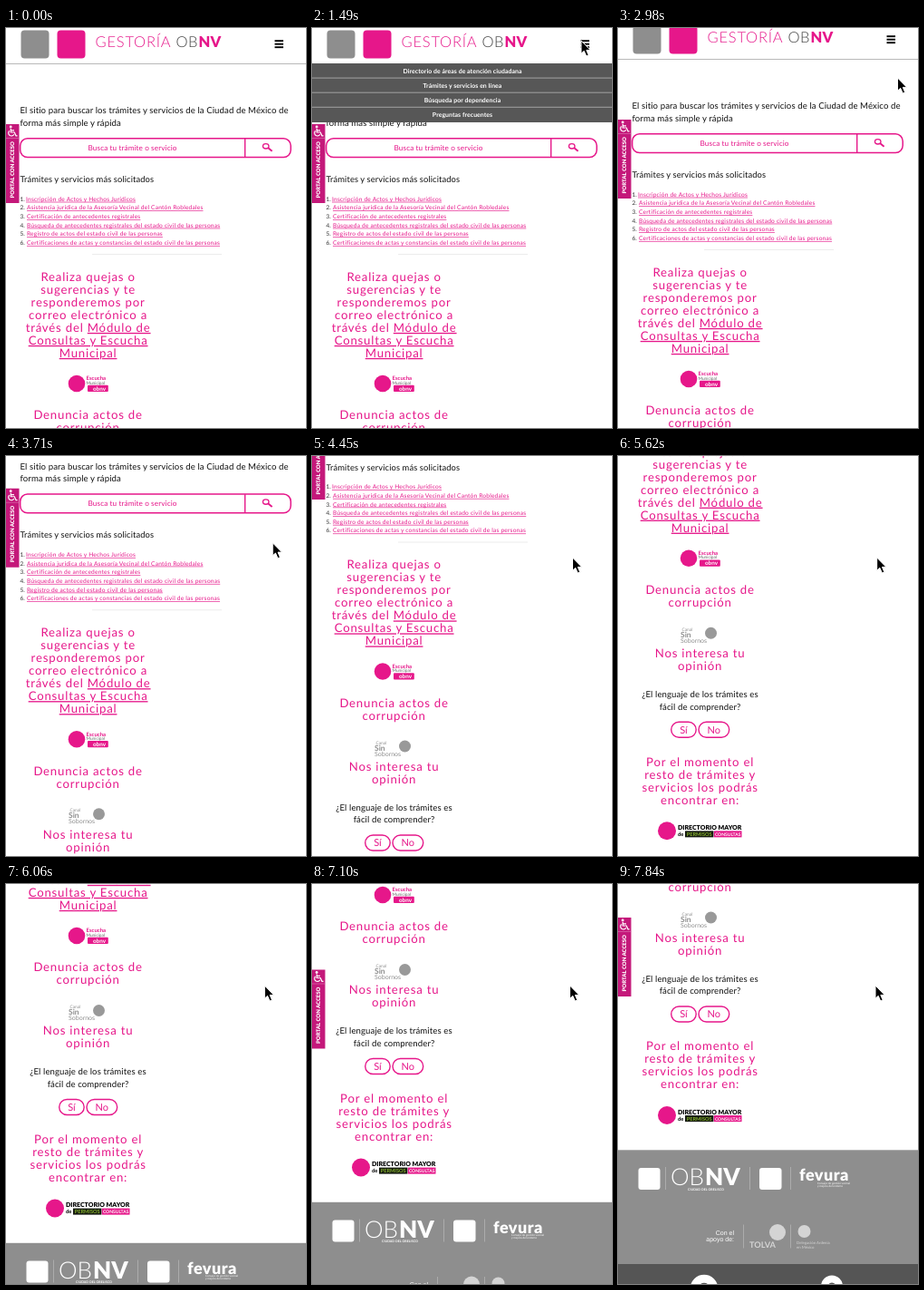
Write an HTML page that moves like this. It is 331x441 px and loops after 7.99 s.

```html
<!DOCTYPE html>
<html lang="es">
<head>
<meta charset="utf-8">
<title>Portal de gestiones</title>
<style>
html, body { margin: 0; width: 100%; height: 100%; overflow: hidden; background: #fff; }
svg { display: block; width: 331px; height: 441px; font-family: Lato, "Open Sans", sans-serif; }
text { text-rendering: geometricPrecision; }
.u { text-decoration: underline; text-decoration-thickness: 0.7px; }
</style>
</head>
<body>
<svg id="stage" viewBox="0 0 331 441"></svg>
<script>
const LOOP = 7990;
const PINK = '#e6178a', DARK = '#111', GREY = '#8e8e8e', PALE = '#d4d4d4';

// ---- markup helpers ----
const text = (x, y, str, size, fill = DARK, extra = '') =>
  `<text x="${x}" y="${y}" font-size="${size}" fill="${fill}" ${extra}>${str}</text>`;
const mid = (x, y, str, size, fill, extra = '') =>
  text(x, y, str, size, fill, 'text-anchor="middle" ' + extra);
const rect = (x, y, w, h, fill, rx = 0, extra = '') =>
  `<rect x="${x}" y="${y}" width="${w}" height="${h}" rx="${rx}" fill="${fill}" ${extra}/>`;
const disc = (x, y, r, fill) => `<circle cx="${x}" cy="${y}" r="${r}" fill="${fill}"/>`;
const line = (x1, y1, x2, y2, stroke, w = 1) =>
  `<path d="M${x1} ${y1}L${x2} ${y2}" stroke="${stroke}" stroke-width="${w}"/>`;
const under = str => `<tspan class="u">${str}</tspan>`;
const bold = 'font-weight="700"';
const light = 'font-weight="300"';
const loose = 'letter-spacing="0.1"';

const heading = (y, rows) => rows.map((row, i) =>
  mid(90.6, y + 4.4 + i * 14, row, 13.2, PINK, 'letter-spacing="0.8"')).join('');

const pill = (x, w, label) =>
  rect(x, 572.5, w, 17, '#fff', 8.5, `stroke="${PINK}" stroke-width="1.4"`) +
  mid(x + w / 2, 584.8, label, 11, PINK);

function header() {
  return rect(16.5, 2.5, 31, 31, GREY, 4) +
    rect(56.5, 2.5, 31, 31, PINK, 4) +
    text(98.5, 21, 'GESTORÍA', 16.5, PINK, light + ' letter-spacing="0.8"') +
    text(187.5, 21, 'OB', 16.5, '#444', light + ' letter-spacing="0.5"') +
    text(212.5, 21, 'NV', 16.5, PINK, 'font-weight="900" letter-spacing="0.3"') +
    [14.2, 17.7, 21.2].map(y => line(296.5, y, 306, y, '#000', 1.9)).join('') +
    line(0, 39.5, 331, 39.5, '#b9b9b9');
}

function search() {
  return rect(15.7, 121.8, 298.5, 20.8, '#fff', 8, `stroke="${PINK}" stroke-width="1.5"`) +
    line(263.7, 122, 263.7, 142.5, PINK, 1.4) +
    mid(139.5, 135, 'Busca tu trámite o servicio', 8.2, PINK, loose) +
    `<ellipse cx="286.7" cy="130.3" rx="3.3" ry="2.7" fill="none" stroke="${PINK}" stroke-width="1.3"/>` +
    line(289.3, 132.3, 293.6, 135.8, PINK, 1.9);
}

function links() {
  const items = [
    'Inscripción de Actos y Hechos Jurídicos',
    'Asistencia jurídica de la Asesoría Vecinal del Cantón Robledales',
    'Certificación de antecedentes registrales',
    'Búsqueda de antecedentes registrales del estado civil de las personas',
    'Registro de actos del estado civil de las personas',
    'Certificaciones de actas y constancias del estado civil de las personas'
  ];
  return items.map((item, i) => {
    const y = 190.7 + i * 9.65;
    return text(15.5, y, i + 1 + '.', 6.5, '#333') +
      text(i ? 23 : 22, y, item, 6.6, PINK, 'class="u" letter-spacing="0.2"');
  }).join('') + line(95, 249.5, 238, 249.5, '#ececec');
}

function badges() {
  return disc(78, 392, 9.3, PINK) +
    text(88.5, 388.4, 'Escucha', 6, PINK, bold) +
    text(88.5, 392.6, 'Municipal', 4.8, '#666') +
    rect(90, 393.8, 22.8, 7.2, PINK, 1) +
    mid(103, 399.5, 'obnv', 6.4, '#fff', bold) +

    text(70.5, 472.2, 'Canal', 4.8, GREY) +
    text(69, 479, 'Sin', 8.5, GREY, bold) +
    text(69, 485, 'Sobornos', 7, GREY) +
    disc(102.5, 474.5, 6.5, '#999') +

    disc(54, 692.5, 10, PINK) +
    text(66, 691, 'DIRECTORIO MAYOR', 7, '#000', 'font-weight="900"') +
    text(66, 698.2, 'de', 5.8, '#000', bold) +
    rect(74, 692.6, 31.4, 7, '#151a10') +
    mid(89.7, 698.2, 'PERMISOS', 5.6, '#86b32d', bold) +
    rect(105.8, 692.6, 30.7, 7, PINK) +
    mid(121.2, 698, 'CONSULTAS', 5, '#fff', bold);
}

function footer() {
  const sep = (x, y, h) => line(x, y, x, y + h, '#b4b4b4', 0.8);
  const arial = 'font-family="Liberation Sans, sans-serif"';
  return rect(0, 730.8, 331, 126, GREY) + rect(0, 856.5, 331, 120, '#555') +
    rect(22.5, 750.5, 24, 24, '#fff', 3) +
    sep(52.5, 749.5, 25) +
    text(58, 769.5, 'OB', 26, '#fff', light) +
    text(96, 769.5, 'NV', 26, '#fff', 'font-weight="900"') +
    mid(97, 775.2, 'CIUDAD DEL OBELISCO', 3.6, '#fff', bold) +
    sep(145.5, 749.5, 25) +
    rect(156, 750.5, 24.5, 24, '#fff', 3) +
    sep(190.5, 749.5, 25) +
    text(200, 764.5, 'fevura', 18, '#fff', 'font-weight="900" letter-spacing="0.5"') +
    text(220, 768.2, 'Consejo de gestión vecinal', 3.1, '#fff') +
    text(220, 771.4, 'y mejora del entorno', 3.1, '#fff') +
    text(128, 824, 'Con el', 7, '#fff', arial + ' text-anchor="end"') +
    text(128, 831.8, 'apoyo de:', 7, '#fff', arial + ' text-anchor="end"') +
    sep(138.5, 813, 26) +
    text(145, 838.3, 'TOLVA', 9.2, PALE, bold) +
    disc(176, 821.5, 9, PALE) +
    sep(190.5, 813, 26) +
    disc(205.5, 820.5, 7, PALE) +
    text(197, 834.3, 'Delegación Ardenia', 4.3, PALE) +
    text(197, 839.2, 'en México', 4.3, PALE) +
    '<g fill="none" stroke="#fff"><circle cx="95" cy="883.5" r="10.8" stroke-width="9"/>' +
    '<circle cx="236" cy="881" r="8" stroke-width="8"/></g>';
}

function page() {
  return header() +
    text(15.5, 94.3, 'El sitio para buscar los trámites y servicios de la Ciudad de México de', 9.6, DARK, loose) +
    text(15.5, 107.8, 'forma más simple y rápida', 9.6, DARK, loose) +
    search() +
    text(15.5, 170, 'Trámites y servicios más solicitados', 9.4, DARK, loose) +
    links() +
    heading(274.5, ['Realiza quejas o', 'sugerencias y te', 'responderemos por',
      'correo electrónico a', 'trávés del ' + under('Módulo de'),
      under('Consultas y Escucha'), under('Municipal')]) +
    heading(427, ['Denuncia actos de', 'corrupción']) +
    heading(497, ['Nos interesa tu', 'opinión']) +
    mid(90.5, 545.2, '¿El lenguaje de los trámites es', 9.6, DARK, loose) +
    mid(90.5, 558.8, 'fácil de comprender?', 9.6, DARK, loose) +
    pill(58.7, 27.5, 'Sí') + pill(89, 33.7, 'No') +
    heading(616.5, ['Por el momento el', 'resto de trámites y',
      'servicios los podrás', 'encontrar en:']) +
    badges() + footer();
}

function sideTab() {
  return rect(0, 106, 14.5, 87, '#c4187a') + line(0, 121.5, 14.5, 121.5, '#dc7ab2', 0.6) +
    disc(5.2, 109, 1.4, '#fff') +
    '<path d="M5.3 111V115H9.3L11 118.8H12.6M5.5 112.8H9M3.8 113.4A3.2 3.2 0 1 0 8.8 117.2" ' +
    'fill="none" stroke="#fff" stroke-width="1.2"/>' +
    `<text transform="translate(8.6 187.5) rotate(-90)" font-size="6" fill="#fff" font-weight="900">PORTAL CON ACCESO</text>`;
}

function menu() {
  const rows = ['Directorio de áreas de atención ciudadana', 'Trámites y servicios en línea',
    'Búsqueda por dependencia', 'Preguntas frecuentes'];
  return rect(0, 39, 331, 65, '#575757') + rows.map((row, i) =>
    mid(166, 50 + i * 16.1, row, 6.9, '#fff', bold + ' letter-spacing="0.06"') +
    (i ? line(0, 39 + i * 16.1, 331, 39 + i * 16.1, '#b5b5b5', 0.8) : '')).join('');
}

const stage = document.getElementById('stage');
stage.innerHTML =
  '<clipPath id="drop"><rect id="dropBox" y="39" width="331" height="0"/></clipPath>' +
  `<g id="page">${page()}</g><g id="tab">${sideTab()}</g>` +
  `<g clip-path="url(#drop)">${menu()}</g>` +
  '<path id="arrow" d="M0 0V14.2L3.2 11.3L5.7 17L8.2 16L5.8 10.4H10.2Z" fill="#000" ' +
  'stroke="#fff" stroke-width="1" stroke-linejoin="round"/>';
const el = id => document.getElementById(id);
const [pageEl, tabEl, dropEl, arrowEl] = ['page', 'tab', 'dropBox', 'arrow'].map(el);

const SCROLL = [[19, 0], [20, 5], [30, 154.5], [35, 223.5], [41, 335], [45, 368.5], [47, 368.5], [53, 437.5]];
const DROP = [[7, 0], [8, 15], [9, 48], [10, 65], [15, 65], [16, 26], [17, 0]];
const CURSOR_X = [[0, 342], [1, 322], [5, 297], [15, 297], [17, 308.5], [20, 308.5], [27, 288.5], [30, 287.5], [35, 286], [53, 284]];
const CURSOR_Y = [[0, 26], [1, 22], [5, 14], [15, 14], [17, 55], [20, 55], [27, 112]];

function track(keys, k) {
  if (k <= keys[0][0]) return keys[0][1];
  for (let i = 1; i < keys.length; i++) {
    const [a, from] = keys[i - 1], [b, to] = keys[i];
    if (k <= b) return from + (to - from) * (k - a) / (b - a);
  }
  return keys[keys.length - 1][1];
}

const tick = ms => Math.min(53, Math.floor((ms + 30) / 148));

function draw(ms) {
  const k = tick(ms);
  const scroll = track(SCROLL, k);
  // The side tab drifts with the page and re-anchors when scrolling settles
  const anchor = k < 21 ? 0 : k < 45 ? 9.5 : 368.5;
  pageEl.setAttribute('transform', `translate(0 ${-scroll})`);
  tabEl.setAttribute('transform', `translate(0 ${anchor - scroll})`);
  dropEl.setAttribute('height', track(DROP, k));
  arrowEl.setAttribute('transform', `translate(${track(CURSOR_X, k)} ${track(CURSOR_Y, k)})`);
}

const start = performance.now();
function loop() {
  draw((performance.now() - start) % LOOP);
  requestAnimationFrame(loop);
}
loop();
</script>
</body>
</html>
```
